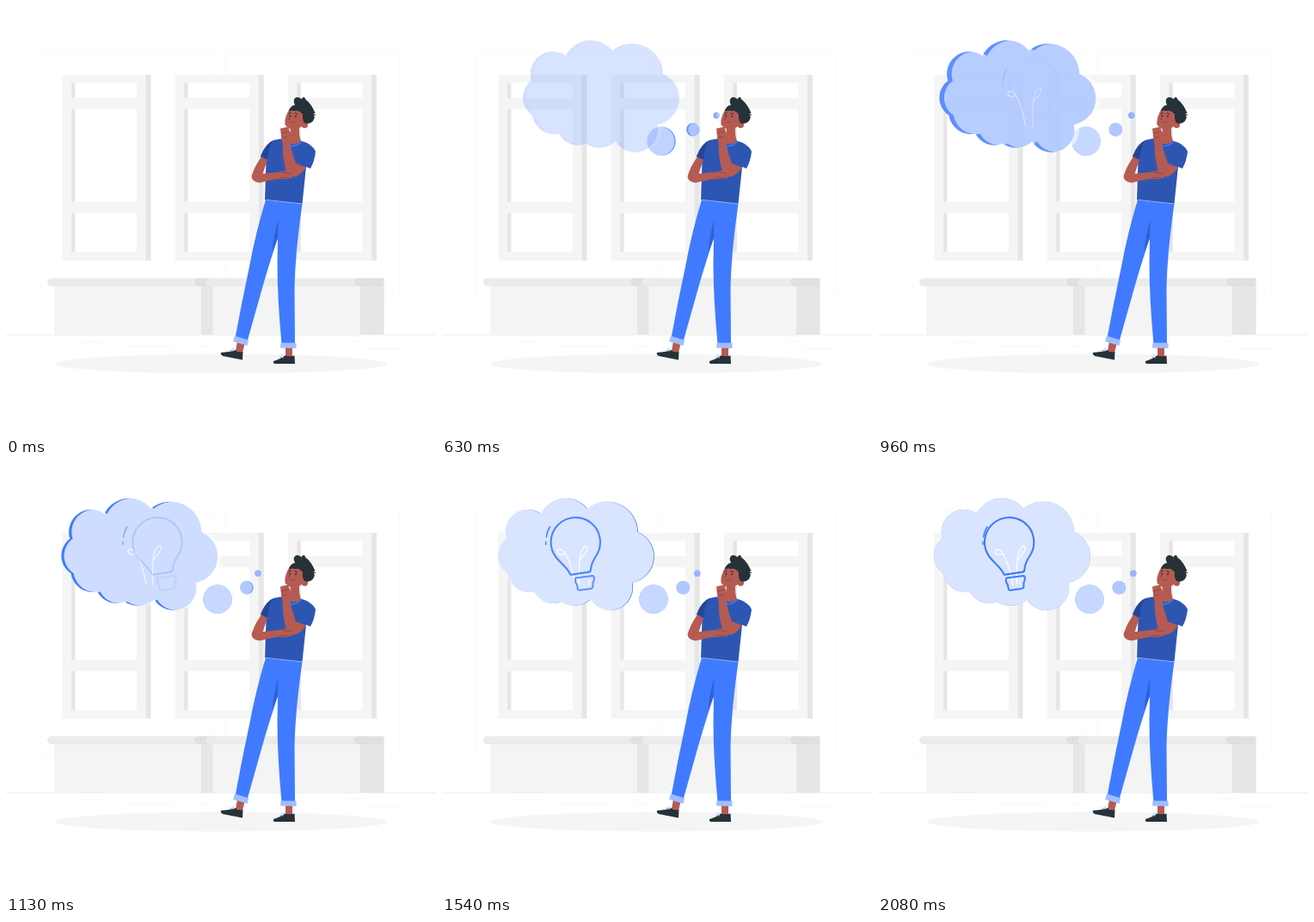
Animation, 500 px wide and 500 px high, one loop 2.12 s. Source, as an HTML page:

```html
<!DOCTYPE html>
<html lang="en">
<head>
<meta charset="utf-8">
<title>Thinking of an idea</title>
<style>
  html, body { margin: 0; width: 100%; height: 100%; overflow: hidden; background: #fff; }
  svg { display: block; width: 100vw; height: 100vh; }
</style>
</head>
<body>
<svg viewBox="0 0 500 500">
  <defs>
    <g id="window">
      <path fill="#e6e6e6" d="M162 80h6.5v216H162z"/>
      <path fill="#f5f5f5" d="M65.500 80H162.500V296H65.500z"/>
      <path fill="#e6e6e6" d="M76 89.500h4.500v17.500H76zM76 120h4.500v107.500H76zM76 241h4.500v45H76z"/>
      <path fill="#fff" d="M80.500 89.500H152v17.500H80.500zM80.500 120H152v107.500H80.500zM80.500 241H152v45H80.500z"/>
    </g>
    <path id="cloud" d="M75 87A26 26 0 0 1 115 58A32 32 0 0 1 169 52A36 36 0 0 1 228 79A31 31 0 0 1 221.500 138A26.500 26.500 0 0 1 173 157.500A28 28 0 0 1 138.500 160A24.500 24.500 0 0 1 107 148.500A26 26 0 0 1 76 127A24.300 24.300 0 0 1 75 87Z"/>
  </defs>

  <g id="room">
    <path fill="none" stroke="#fafafa" d="M39.500 55.500H242.500V337H39.500zM255.500 55.500H457.500V337H255.500z"/>
    <use href="#window"/>
    <use href="#window" x="131.200"/>
    <use href="#window" x="262.400"/>
    <path fill="#f4f4f4" d="M56 325H228V382H56zM240 325H413V382H240z"/>
    <path fill="#e6e6e6" d="M227 325h13.500v57H227zM412 325h27.500v57H412z"/>
    <rect x="48" y="316.500" width="190" height="9.500" rx="4.700" fill="#ebebeb"/>
    <rect x="219.500" y="316.500" width="24" height="9.500" rx="4.700" fill="#e0e0e0"/>
    <rect x="232.500" y="316.500" width="190" height="9.500" rx="4.700" fill="#ebebeb"/>
    <path fill="#e0e0e0" d="M409.500 316.500H439.500V326H409.500a4.700 4.700 0 0 1 0-9.500z"/>
    <path stroke="#f0f0f0" d="M0 382.500H500"/>
    <path stroke="#f7f7f7" d="M88 390.500h24M137 395.500h58M225 395.500h14M400 389.500h16M418 398.500h40"/>
    <ellipse cx="249.500" cy="416" rx="193.500" ry="11.300" fill="#f5f5f5"/>
  </g>

  <g id="man">
    <g fill="#b55b52">
      <path d="M269 390L277.500 393L275 403L267 401z"/>
      <path d="M325 396H333V408H325z"/>
    </g>
    <g fill="#263238">
      <path d="M250 403C256 402 262 402 266.500 400Q270 403 275.500 402L275 411.500L252 407Q249 405 250 403z"/>
      <path d="M311 413C317 411 321 409 324 406.500Q330 408 335.500 406.500L336 416H312Q310.500 415 311 413z"/>
    </g>
    <path fill="none" stroke="#9fbdff" d="M260 400l5 1M263 398l3 3M318 408l5 1M320 405l3 3"/>
    <path fill="#407bff" d="M302 225L344.500 230Q336 290 335.500 330L336 393H320.500Q315.500 340 315.500 300L316 270Q304 306 296 335Q289 360 280.500 390L266.500 386Q274 345 283 303Q290 265 302 225z"/>
    <path fill="#2f61d6" d="M316.500 249Q311 266 309.500 286L316 270z"/>
    <path fill="#9fbdff" d="M266 383.500L282 388.500L280.500 395L264 390zM319.500 391.500L337.500 391.800L337.500 398L319 397.500z"/>
    <path fill="#2d56b3" d="M311 156Q320 153.500 331 153.500L342 156.500Q356 160 360 169Q359 180 354 189L349 187L344.500 230L301 225.500L302.500 179L296 175Q302 159 311 156z"/>
    <path fill="#244695" d="M310 157Q301 162 296 175L302.500 179.500L304.500 176Q305 166 310 157z"/>
    <path stroke="#9fbdff" stroke-width=".8" d="M302 225.300L344 230"/>
    <g fill="#b55b52">
      <path d="M331 139L341 140Q340.500 152 343 157Q338 162 330 160z"/>
      <path d="M297 175.500L304 179L298.500 195L318 193Q329 189 335 194L332 200Q321 202 315 201L295 205.500Q286 205 285.500 198Q289 186 297 175.500z"/>
      <path d="M322 161L330 157Q332 170 337 183L348.500 187.500Q344 196 336 198.500Q328 199 326 192Q321 176 322 161z"/>
      <path d="M319 142.500L328 140.500L332 151L330 161L322 163L320 152z"/>
      <path d="M329.500 120Q323 131 324.500 138Q328 143.500 335 143.500Q344 142 349 135L347 121Q338 113 329.500 120z"/>
      <circle cx="347.300" cy="138.200" r="3.700"/>
    </g>
    <path fill="none" stroke="#407bff" stroke-width="1.300" d="M329 162.500Q338 164 343.500 157.500"/>
    <path fill="none" stroke="#8f413b" stroke-width=".8" d="M320 148l8-2M321 153l6-1M318 199q6 2 11 0M321 193l10 2M330.500 128.500l-2.500 3.500h2.500M331 135.500q3-1.500 5.500 0"/>
    <path fill="#263238" d="M329 122.500Q330 116 336 115Q332.500 108 338 106Q342 106 343.500 108.500Q344 105.500 347 106Q348 109 350 110Q355 114 359.500 124.500L357.500 125.500Q361 132 354 136Q350 137.500 347 136Q344.500 133 345 126Q341 120.500 336 122Q333 121 329 122.500z"/>
    <path fill="none" stroke="#263238" d="M328.500 125.300l3-1.300M335.500 124.500l3.500 1.500M357.500 126.500l2.500 0"/>
    <g fill="#263238">
      <circle cx="330.300" cy="127.800" r="1"/>
      <circle cx="337" cy="128.300" r="1"/>
    </g>
  </g>

  <g id="thought"></g>
</svg>
<script>
const LOOP = 2120, BLUE = '#407bff';
const thought = document.getElementById('thought');
const parts = [];

// Each part slides in from the right and fades up.
function part(markup, distance, start, duration, opacity = 1) {
  const node = document.createElementNS('http://www.w3.org/2000/svg', 'g');
  node.innerHTML = markup;
  thought.append(node);
  parts.push({ node, distance, start, duration, opacity });
}

const bubble = (x, y, r, fill) => `<circle cx="${x}" cy="${y}" r="${r}" fill="${fill}"/>`;
const cloud = fill => `<use href="#cloud" fill="${fill}"/>`;
const line = (d, color, width) =>
  `<path d="${d}" fill="none" stroke="${color}" stroke-width="${width}" stroke-linecap="round" stroke-linejoin="round"/>`;

part(bubble(246, 157.3, 16.7, BLUE), 60, 15, 1100);
part(bubble(246, 157.3, 16.7, '#fff'), 60, 0, 1100, .7);
part(bubble(280.3, 143.8, 7.8, BLUE), 60, 45, 1100);
part(bubble(280.3, 143.8, 7.8, '#fff'), 60, 65, 1100, .59);
part(bubble(296.8, 127.2, 3.7, BLUE), 60, 100, 1200);
part(bubble(296.8, 127.2, 3.7, '#fff'), 60, 150, 1160, .45);
part(cloud(BLUE), 38, 345, 1120);
part(cloud('#fff'), 38, 415, 1160, .8);

// Filaments, highlight, glass and cap of the bulb
part(line('M156.500 140C154 125 151 112 144 102C141 98 135 99 136 102C137 106 142 106 145 104', '#fff', 1.2), 30, 500, 1200);
part(line('M161.500 140C161 125 161 110 164 102C166 96 171 93 171 97C171 104 165 107 162 112', '#fff', 1.2), 30, 583, 1150);
part(line('M127 73Q123.500 78 122.700 85M122 90.500V93.500', BLUE, 1.4), 30, 660, 1180);
part(line('M146.500 128.500C144 121 136 116 130 108.500A28.700 28.700 0 1 1 177 106C173 112 170.500 118 170.300 123Q170 125.300 168 125.600L148 128.600Q147 128.900 146.500 128.500Z', BLUE, 2.1), 30, 844, 1160);
part(line('M150 132.500L169 130Q171 130 171 132.500L170.500 136Q169.500 137.500 169.500 139V143Q169 144.500 167 144.900L154 146.800Q152 146.800 151.800 145L151 140.500Q150.500 139.500 149.500 138.500L148.800 134.500Q148.500 133 150 132.500Z', BLUE, 2), 30, 925, 1160);
part(line('M165 134.500l.5 5', '#fff', 1.2), 30, 915, 1160);

const bezier = (a, b, s) => 3 * (1 - s) ** 2 * s * a + 3 * (1 - s) * s * s * b + s ** 3;

// cubic-bezier(.36, -.01, .5, 1.38)
function ease(x) {
  if (x <= 0) return 0;
  if (x >= 1) return 1;
  let low = 0, high = 1;
  for (let i = 0; i < 24; i++) {
    const mid = (low + high) / 2;
    if (bezier(.36, .5, mid) < x) low = mid; else high = mid;
  }
  return bezier(-.01, 1.38, low);
}

function draw(time) {
  for (const { node, distance, start, duration, opacity } of parts) {
    const e = ease((time - start) / duration);
    node.setAttribute('transform', `translate(${(distance * (1 - e)).toFixed(3)} 0)`);
    node.setAttribute('opacity', (opacity * Math.min(1, Math.max(0, e))).toFixed(4));
  }
}

const origin = performance.now();
function tick() {
  draw((performance.now() - origin) % LOOP);
  requestAnimationFrame(tick);
}
draw(0);
requestAnimationFrame(tick);
</script>
</body>
</html>
```
